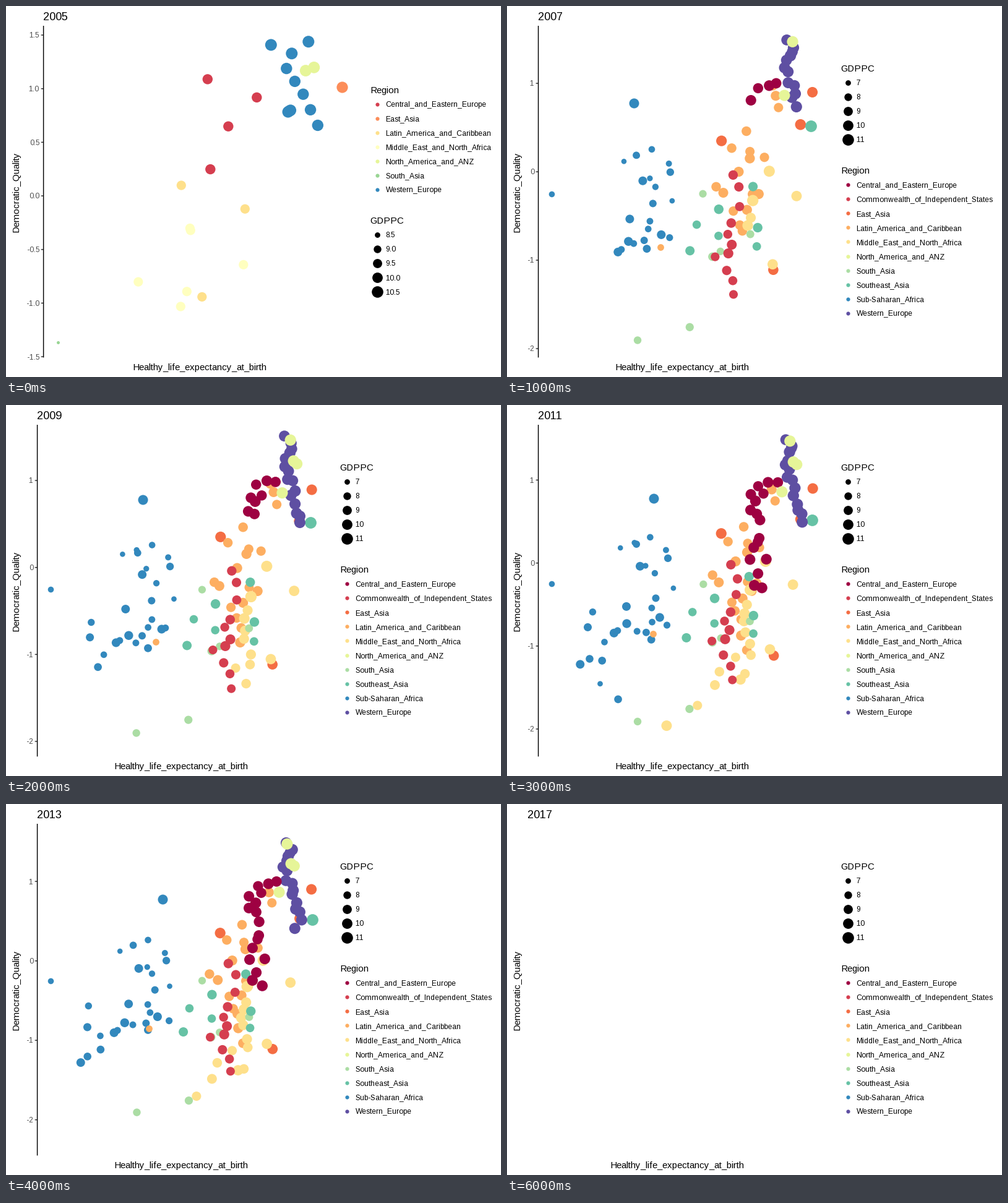
Animation of 800x600 px, one loop 6.5 s. Source, as a matplotlib script:

```python
import numpy as np
import matplotlib
import matplotlib.pyplot as plt
from matplotlib.animation import FuncAnimation

matplotlib.rcParams.update({
    "font.family": "Liberation Sans",
    "text.hinting": "force_autohint",
    "text.hinting_factor": 1,
})

REGIONS = [
    "Central_and_Eastern_Europe", "Commonwealth_of_Independent_States",
    "East_Asia", "Latin_America_and_Caribbean",
    "Middle_East_and_North_Africa", "North_America_and_ANZ", "South_Asia",
    "Southeast_Asia", "Sub-Saharan_Africa", "Western_Europe",
]
CEE, CIS, EAS, LAC, MENA, ANZ, SAS, SEA, SSA, WEU = range(10)
COLORS = ["#9E0142", "#D53E4F", "#F46D43", "#FDAE61", "#FEE08B",
          "#E6F598", "#ABDDA4", "#66C2A5", "#3288BD", "#5E4FA2"]
# The first year has only seven regions, so its palette is spaced wider.
FIRST_COLORS = {CEE: "#D53E4F", EAS: "#FC8D59", LAC: "#FEE08B",
                MENA: "#FFFFBF", ANZ: "#E6F598", SAS: "#99D594",
                WEU: "#3288BD"}

# First year: region, radius, number of bubbles, path of (x pixel, value).
FIRST_GROUPS = [
    (WEU, 9.5, 3, [(428, 1.41), (461.5, 1.33), (488.5, 1.44)]),
    (WEU, 9.2, 5, [(453, 1.19), (480, 0.95), (503.5, 0.66)]),
    (WEU, 9.3, 3, [(459.5, 0.8), (455.5, 0.785)]),
    (ANZ, 9.4, 2, [(484, 1.17), (497.5, 1.2)]),
    (EAS, 9.1, 1, [(543, 1.02)]),
    (CEE, 8.2, 4, [(325.5, 1.09), (405, 0.92), (359, 0.65), (330, 0.25)]),
    (LAC, 7.6, 3, [(283, 0.1), (386, -0.12), (316.5, -0.94)]),
    (MENA, 7.6, 6, [(297, -0.3), (298, -0.32), (383.5, -0.64),
                    (213.5, -0.8), (292, -0.89), (282, -1.03)]),
    (SAS, 2.5, 1, [(83.5, -1.364)]),
]

# Later years: region, radius, radius spread, jitter in pixels, drift in
# pixels per decade, bubble counts in COUNT_YEARS, path of (x pixel, value).
COUNT_YEARS = [2006, 2008, 2011, 2015]
GROUPS = [
    (SSA, 5.6, 1.6, 9, 0, [20, 24, 30, 27],
     [(230, 0.25), (190, 0.2), (270, 0.1), (205, -0.1), (262, -0.3),
      (200, -0.5), (268, -0.7), (225, -0.75), (175, -0.8), (240, -0.95),
      (115, -0.6), (165, -1.05), (105, -1.25), (180, -1.6)]),
    (SSA, 4.8, 0, 0, 0, [1, 1, 1, 1], [(72, -0.25)]),
    (SSA, 8, 0, 0, 80, [1, 1, 1, 1], [(237, 0.78)]),
    (EAS, 8.6, 0.4, 1, 0, [3, 4, 4, 4],
     [(475, 0.54), (431, -1.11), (493, 0.9), (346, 0.36)]),
    (LAC, 7.8, 0.4, 4, -12, [19, 18, 20, 19],
     [(422, 0.95), (434, 0.75), (350, 0.28), (412, 0.2), (380, 0.08),
      (315, -0.22), (410, -0.25), (388, -0.35), (360, -0.5), (374, -0.7),
      (385, -1.03)]),
    (LAC, 5.4, 0, 0, -28, [1, 1, 1, 1], [(236, -0.85)]),
    (MENA, 8.8, 0.5, 2, -12, [3, 4, 4, 4],
     [(418, 0), (463, -0.27), (425, -1.05), (393, -0.32)]),
    (MENA, 8.1, 0.6, 4, -8, [0, 5, 13, 12],
     [(388, -0.5), (378, -0.65), (386, -0.85), (398, -1.08), (372, -1.17),
      (389, -1.4), (342, -1.3), (335, -1.53), (258, -1.95)]),
    (SAS, 6.5, 0.6, 1, 0, [5, 6, 6, 6],
     [(317, -0.25), (344, -0.9), (332, -0.95), (392, -0.7),
      (210, -1.9), (295, -1.75)]),
    (SEA, 9.4, 0, 0, 6, [1, 1, 1, 1], [(493, 0.52)]),
    (SEA, 7.2, 0.6, 1, -16, [7, 7, 7, 7],
     [(390, -0.17), (336, -0.42), (299, -0.6), (290, -0.9), (335, -0.72),
      (399, -0.63), (397, -0.85)]),
    (CIS, 7.6, 0.7, 3, -8, [11, 11, 11, 11],
     [(364, -0.03), (375, -0.25), (364, -0.55), (352, -0.75), (362, -0.9),
      (331, -0.97), (359, -1.2), (364, -1.38)]),
    (WEU, 9, 0.2, 4, 0, [8, 15, 15, 17],
     [(453, 1.47), (464, 1.38), (450, 1.17), (456, 1.06), (463, 0.87),
      (469, 0.7), (480, 0.53), (454, 0.3)]),
    (CEE, 8.5, 0.3, 4, 0, [5, 3, 17, 17],
     [(391, 0.84), (408, 0.96), (440, 1.02), (408, 0.76), (388, 0.66),
      (411, 0.58), (402, 0.37), (407, 0.25), (389, 0.06), (422, 0.05),
      (392, -0.26), (413, -0.3)]),
    (ANZ, 9.1, 0.1, 1, -12, [1, 4, 4, 4],
     [(443, 0.86), (457, 1.47), (462, 1.22), (467, 1.19)]),
]

# Pixel position of zero and pixels per unit on the vertical axis.
SCALE_YEARS = [2006, 2008, 2011, 2013, 2015]
ZERO = [269.9, 266.3, 255.6, 253.7, 245.1]
UNIT = [142.1, 143.9, 134.2, 128.5, 122]


def scale(year):
    if year == 2005:
        return 307.1, 173.4
    return (np.interp(year, SCALE_YEARS, ZERO),
            np.interp(year, SCALE_YEARS, UNIT))


def along(keys, n):
    """n points evenly spaced along a path of key points."""
    xs, values = np.transpose(keys)
    steps = np.arange(len(keys))
    pos = np.linspace(0, len(keys) - 1, n)
    return np.interp(pos, steps, xs), np.interp(pos, steps, values)


def first_bubbles():
    for region, radius, n, keys in FIRST_GROUPS:
        yield FIRST_COLORS[region], *along(keys, n), np.full(n, radius)


def later_bubbles(year):
    for seed, group in enumerate(GROUPS):
        region, radius, spread, jitter, drift, counts, keys = group
        n = max(counts)
        alive = int(round(np.interp(year, COUNT_YEARS, counts)))
        rng = np.random.default_rng(seed)
        x, value = along(keys, n)
        jx, jv, jr = rng.uniform(-1, 1, (3, n))
        phase = rng.uniform(0, 2 * np.pi, n)
        sway = np.sin(phase + 0.8 * (year - 2006))
        x = x + jitter * (jx + 0.4 * sway) + drift * (year - 2011) / 10
        value = value + 0.008 * jitter * (jv + 0.5 * np.cos(phase + year))
        r = radius + spread * jr
        yield COLORS[region], x[:alive], value[:alive], r[:alive]


fig = plt.figure(figsize=(800 / 72, 600 / 72), dpi=72, facecolor="white")
ax = fig.add_axes([0, 0, 1, 1])


def label(x, y, text, size, **kw):
    ax.text(x, y, text, fontsize=size, **{"color": "black", **kw})


def circles(x, y, r, color):
    ax.scatter(x, y, s=(2 * np.asarray(r)) ** 2, color=color, linewidths=0)


def line(xs, ys, color):
    ax.plot(xs, ys, color=color, lw=1.45, solid_capstyle="butt", snap=False)


def axis(x, zero, unit, values, fmt):
    for v in values:
        y = zero - unit * v
        line([x - 3.9, x], [y, y], "#333333")
        label(x - 6.8, y + 4.3, fmt % v, 12, ha="right", color="#4D4D4D")
    line([x, x], [32, 568.5], "black")


def legend(x, y, title, names, radii, colors):
    label(x, y, title, 15)
    for i, (name, r, color) in enumerate(zip(names, radii, colors)):
        row = y + 18.2 + 23.04 * i
        circles([x + 12.3], [row], [r], color)
        label(x + 25.6, row + 4.4, name, 12)


def size_legend(x, y, names):
    legend(x, y, "GDPPC", names, [4.4, 6.2, 7.4, 8.4, 9.3], ["black"] * 5)


def region_legend(x, y, colors):
    legend(x, y, "Region", [REGIONS[k] for k in colors],
           [3.1] * len(colors), colors.values())


def draw(frame):
    year = 2005 + frame
    first, last = year == 2005, year == 2017
    ax.clear()
    ax.set(xlim=(0, 800), ylim=(600, 0))
    ax.axis("off")

    left = 60 if first else 33 if last else 50
    label(left, 23, str(year), 18)
    label(313 if first else 275 if last else 283, 589,
          "Healthy_life_expectancy_at_birth", 15, ha="center")
    label(20, 300.5, "Democratic_Quality", 15, rotation=90, ha="center",
          va="baseline", rotation_mode="anchor")

    if not last:
        zero, unit = scale(year)
        if first:
            axis(60.6, zero, unit, np.arange(-1.5, 2, 0.5), "%.1f")
        else:
            axis(50.6, zero, unit, range(-2, 2), "%d")
        groups = first_bubbles() if first else later_bubbles(year)
        for color, x, value, r in groups:
            circles(x + 0.3, zero - unit * value + 0.3, r, color)

    if first:
        region_legend(588, 140.6, FIRST_COLORS)
        size_legend(588, 351.8, ["8.5", "9.0", "9.5", "10.0", "10.5"])
    else:
        size_legend(539, 105.6, ["7", "8", "9", "10", "11"])
        region_legend(539, 271.1, dict(enumerate(COLORS)))
    return ax.get_children()


anim = FuncAnimation(fig, draw, frames=13, interval=500, repeat=True,
                     repeat_delay=0, init_func=lambda: [])
plt.show()
```
